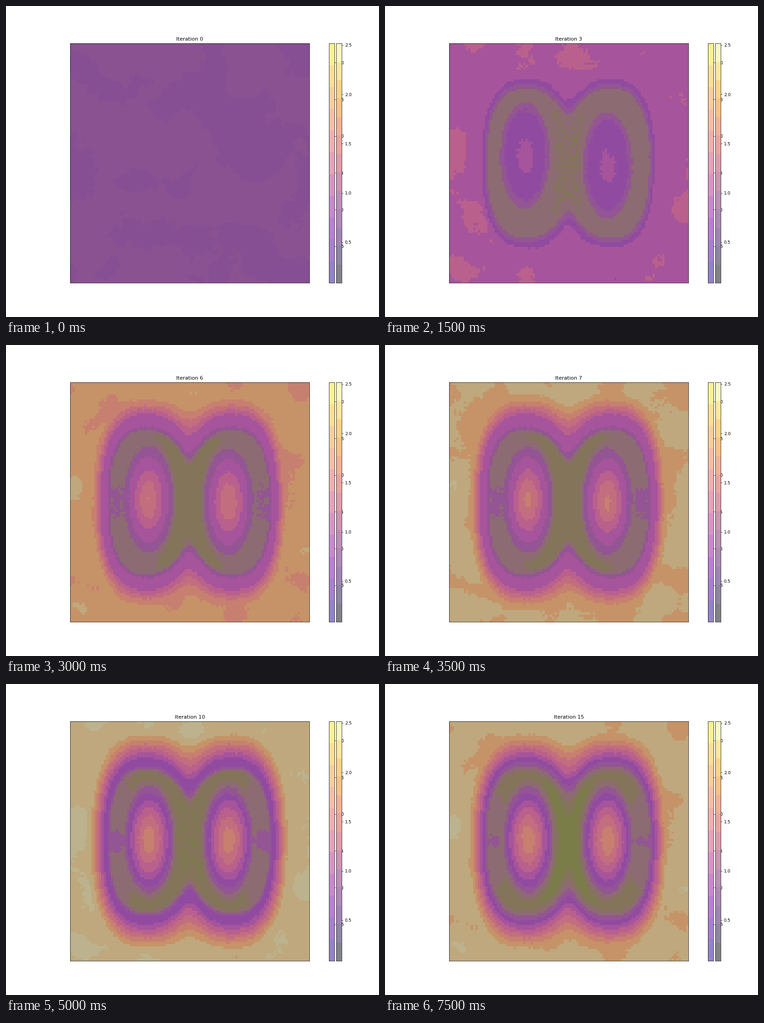
A matplotlib script that plays this animation: 820x683 px, repeating every 8000 ms.

```python
import matplotlib.pyplot as plt
import numpy as np
from matplotlib.animation import FuncAnimation

W, H, DPI = 820, 683, 64
PT = 72 / DPI                      # points per pixel
N, FRAMES = 100, 16
LEFT, TOP, SIDE = 141.1, 82.0, 525.9
CX, CY = 403, 345

plt.rcParams.update({
    "font.family": "DejaVu Sans",
    "axes.linewidth": 0.76 * PT,
    "ytick.major.width": 0.76 * PT,
    "ytick.major.size": 3.3 * PT,
    "ytick.major.pad": 3.3 * PT,
    "ytick.labelsize": 9.49 * PT,
})


def rgb(name, value):
    return plt.get_cmap(name)(value)[..., :3]


def overlay(a, b):
    """Half-transparent inferno over half-transparent plasma over white."""
    return 0.25 + 0.25 * rgb("plasma", a) + 0.5 * rgb("inferno", b)


LEVELS = np.arange(13)
PALETTE = overlay(np.interp(LEVELS, [0, 2, 4, 7, 10], [1, 0.75, 0.21, 0.1, 0]),
                  np.interp(LEVELS, [0, 2, 4, 6, 10, 12], [0, 0.12, 0.3, 0.55, 0.88, 0.97]))
FLAT = np.array([(138, 82, 145), (134, 78, 147)]) / 255

cells = (np.arange(N) + 0.5) * SIDE / N
X, Y = np.meshgrid(LEFT + cells, TOP + cells)
U, DY = np.abs(X - CX), np.abs(Y - CY)
rng = np.random.default_rng(7)


def smooth_noise(width):
    f = np.fft.fftfreq(N)
    low = np.exp(-2 * (np.pi * width) ** 2 * (f[:, None] ** 2 + f ** 2))
    z = np.fft.ifft2(np.fft.fft2(rng.standard_normal((N, N))) * low).real
    return z / z.std()


def bump(x, y, r=30):
    return np.exp(-((X - x) ** 2 + (Y - y) ** 2) / r ** 2)


def oval(cx, cy, rx, ry, p=2):
    return (np.abs((X - cx) / rx) ** p + np.abs((Y - cy) / ry) ** p) ** (1 / p)


def smooth_max(k, *fields):
    return np.logaddexp.reduce([k * f for f in fields]) / k


def smooth_min(k, *fields):
    return -smooth_max(k, *[-f for f in fields])


TINT = smooth_noise(5) + 0.2 * smooth_noise(1)
BLOTCH = 0.22 * smooth_noise(4) + 0.05 * smooth_noise(1)
for spot in [(141, 312), (160, 568), (206, 92), (408, 123), (660, 450)]:
    BLOTCH += 0.7 * bump(*spot)
GRAIN = 0.04 * rng.standard_normal((N, N))

# two rounded lobes joined, with the waist between them drawn in
WAIST = np.exp(-(U / 35) ** 2)
LOBES = smooth_min(4.8, oval(308, CY, 100, 195, 2.5), oval(498, CY, 100, 195, 2.5))
LOBES = 1 - (1 - LOBES) * (1 + 0.5 * WAIST * (LOBES < 1))


def outside(t):
    steep = np.clip(t - 3, 0, 1) * np.clip((13 - t) / 4, 0, 1)
    return 4.5 + 20 * (LOBES - 0.94) + 1.3 * steep * np.exp(-((LOBES - 0.85) / 0.05) ** 2)


def holes(t):
    drift = 14 * np.exp((3 - max(t, 3)) / 2)
    q = np.minimum(oval(315 - drift / 2, 342 - drift, 0.46, 1),
                   oval(489, 343 + drift / 2, 0.46, 1))
    peak = 8.3 - 3.3 * np.exp((3 - max(t, 3)) / 2.2)
    dome = 3.4 + (peak - 3.4) * (1 - np.minimum(q / 105, 1) ** 1.5)
    return dome - 0.075 * np.maximum(q - 105, 0)


def crest(t):
    """Lowest level along the ring: deep in the waist, shallow at the sides."""
    core = max(0, 1.6 - 0.14 * max(t - 3, 0))
    top = core + 0.5
    gap = 105 * np.exp((3 - t) / 8)
    fade = np.minimum(np.exp((gap - DY) / 150), 1.3)
    return (core - 0.1 + 0.5 * np.clip((U - 25) / 60, 0, 1)
            + (2.4 - top) * np.clip((U - 92) / 60, 0, 1) * fade)


def level(t):
    ground = np.interp(t, [0, 3, 4, 8, 15], [3.4, 5.1, 7.1, 10.3, 9.7]) + BLOTCH
    s = smooth_max(4, outside(t), holes(t), crest(t))
    s = smooth_min(2, s, ground)
    return ground + np.clip((t - 1) / 2, 0, 1) * (s - ground) + GRAIN


def picture(t):
    if t < 2:
        tint = TINT + 0.4 * t * BLOTCH * (X > 383)
        return FLAT[(tint > 0).astype(int)]
    s = level(t)
    index = np.clip(np.rint(s), 0, LEVELS[-1]).astype(int)
    if 4 <= t < 10:                # these steps jump straight across the violet
        index = np.where(index == 4, np.where(s > 4, 5, 3), index)
    return PALETTE[index]


fig = plt.figure(figsize=(W / DPI, H / DPI), dpi=DPI, facecolor="white")


def box(x, y, w, h):
    return fig.add_axes([x / W, 1 - (y + h) / H, w / W, h / H])


def colorbar(x, width, name, bands, low, high, ticks):
    bar = box(x, TOP, width, SIDE)
    steps = (np.arange(bands) + 0.5) / bands
    bar.imshow(0.5 + 0.5 * rgb(name, steps)[:, None], origin="lower", aspect="auto",
               interpolation="nearest", extent=(0, 1, low, high))
    bar.set(xticks=[], yticks=ticks)
    bar.set_yticklabels([f"{v:.1f}" for v in ticks])
    bar.yaxis.tick_right()


ax = box(LEFT, TOP, SIDE, SIDE)
image = ax.imshow(picture(0), interpolation="nearest", aspect="auto")
ax.set(xticks=[], yticks=[])
title = ax.set_title("Iteration 0", fontsize=11.39 * PT, pad=5.7 * PT)

colorbar(710.2, 11.3, "plasma", 11, 0.004, 3.262, np.arange(0.5, 3.1, 0.5))
colorbar(726.2, 12, "inferno", 13, 0.089, 2.518, np.arange(0.5, 2.6, 0.5))


def update(t):
    image.set_data(picture(t))
    title.set_text(f"Iteration {t}")
    return image, title


anim = FuncAnimation(fig, update, frames=FRAMES, interval=500,
                     repeat=True, repeat_delay=0, blit=False)
plt.show()
```
